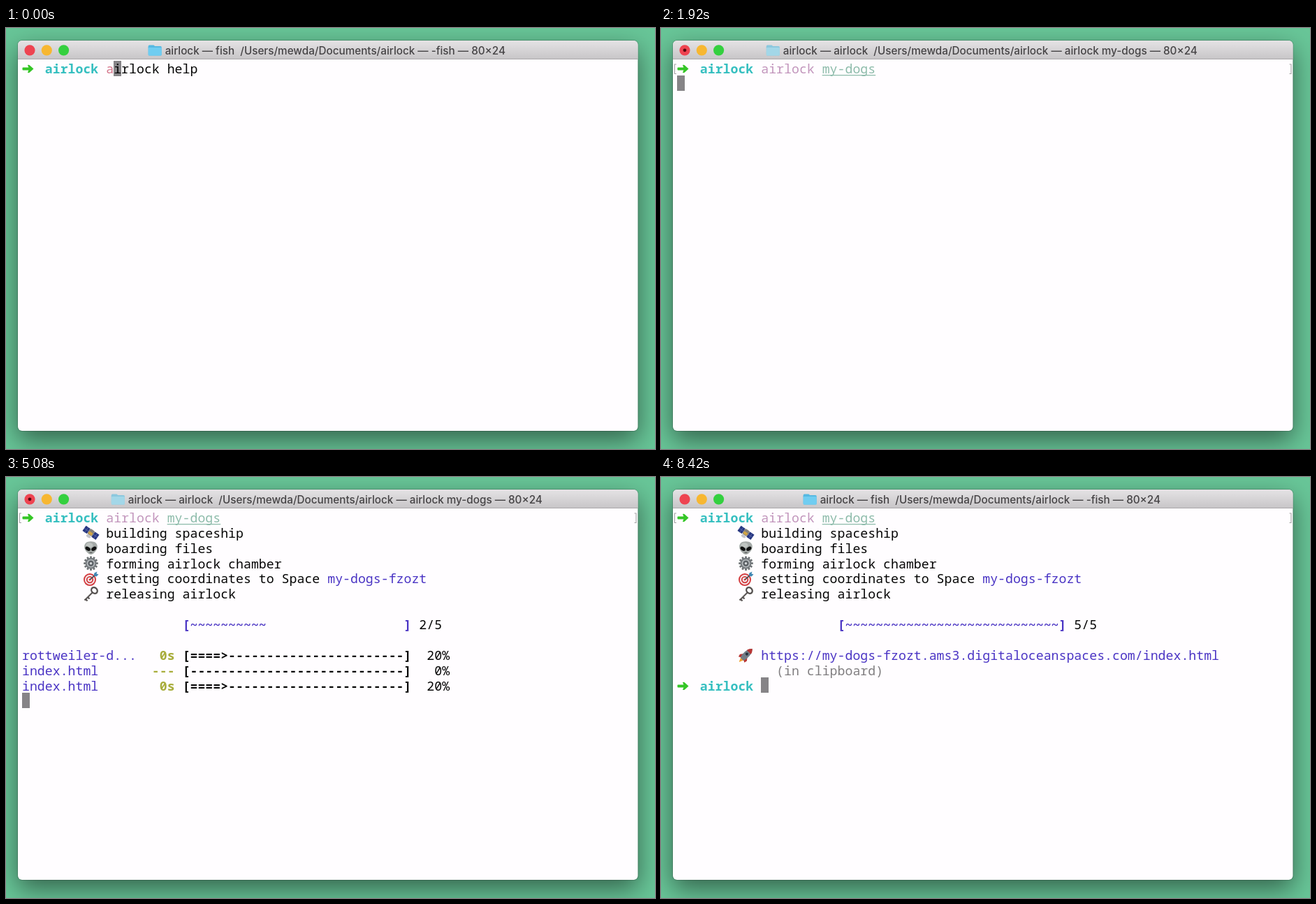
An HTML page with a canvas for the animation above (8.58 s loop, 929x603 px).

```html
<!DOCTYPE html>
<html lang="en">
<head>
<meta charset="utf-8">
<title>Airlock terminal</title>
<style>
  html, body { margin: 0; width: 100%; height: 100%; overflow: hidden; background: #68c698; }
  canvas { display: block; }
</style>
</head>
<body>
<canvas id="stage" width="929" height="603"></canvas>
<script>
const ctx = document.getElementById('stage').getContext('2d');
const LOOP = 8580, LEFT = 23, CELL = 10.93, TOP = 46.5, LINE = 21.9;
const BLACK = '#050505', CYAN = '#36bfc0', GREEN = '#35c626', MAUVE = '#c295bc', RED = '#d5778c',
      TEAL = '#8dbbaa', BLUE = '#4a34c4', OLIVE = '#a8ad3b', GREY = '#807e80', CURSOR = '#868487';

const COMMAND = 'airlock my-dogs';
const KEYS = [0, 80, 170, 330, 420, 500, 750, 920, 1080, 1170, 1330, 1330, 1500, 1580, 1670];
const ENTER = 1830, DONE = 5920, PROMPT = 6080;
const STEPS = [
  [2000, 'building spaceship', satellite],
  [2080, 'boarding files', alien],
  [2170, 'forming airlock chamber', gear],
  [4250, 'setting coordinates to Space', target],
  [4330, 'releasing airlock', key]
];
const UPLOAD = 4420;
const COUNTS = [4670, 5000, 5250, 5330, 5420];
const FILES = [['rottweiler-d...', 4670], ['index.html', 5250], ['index.html', 5080]];

const passed = (times, t) => times.filter(x => x <= t).length;
const colX = col => LEFT + col * CELL;
const rowY = row => TOP + row * LINE;

function box(x, y, w, h, color, r = 0) {
  ctx.fillStyle = color;
  ctx.beginPath();
  ctx.roundRect(x, y, w, h, r);
  ctx.fill();
}

function oval(x, y, rx, ry, color, turn = 0) {
  ctx.fillStyle = color;
  ctx.beginPath();
  ctx.ellipse(x, y, rx, ry, turn, 0, 7);
  ctx.fill();
}

function shape(path, color) {
  ctx.fillStyle = color;
  ctx.fill(new Path2D(path));
}

function line(path, color, width) {
  ctx.strokeStyle = color;
  ctx.lineWidth = width;
  ctx.stroke(new Path2D(path));
}

// One character per terminal cell
function text(str, col, row, color = BLACK, weight = 500) {
  ctx.font = `${weight} 18.2px "Noto Sans Mono", "DejaVu Sans Mono", monospace`;
  ctx.textAlign = 'left';
  ctx.fillStyle = color;
  [...str].forEach((c, i) => ctx.fillText(c, colX(col + i), rowY(row) + 18.3));
}

function cursor(col, row) {
  box(Math.round(colX(col)), Math.round(rowY(row)), 11, 22, CURSOR);
}

function icon(draw, row) {
  ctx.save();
  ctx.translate(121.5, rowY(row) + 11.5);
  draw();
  ctx.restore();
}

function satellite() {
  ctx.rotate(0.6);
  for (const x of [-11.5, 4]) {
    box(x, -4.5, 7.5, 9, '#26357f');
    line(`M${x + 4} -4.5v9M${x} 0h7.5`, '#5f6fb4', 0.7);
  }
  box(-4, -5, 8, 9, '#85807a', 2);
  box(-3, -1, 6, 4, '#d2a544', 1);
  oval(0, 6, 3.5, 2, '#c4c5ca');
}

function alien() {
  shape('M0 -9.5C12 -9.5 11 2 5 6.5C2 10 -2 10 -5 6.5C-11 2 -12 -9.5 0 -9.5', '#a5aaa8');
  oval(-2, -4, 5, 3.5, '#c0c5c2');
  oval(-4.3, 1, 4, 2.6, '#111', 0.6);
  oval(4.3, 1, 4, 2.6, '#111', -0.6);
  line('M-2 6.5h4', '#444', 1);
}

function gear() {
  for (let i = 0; i < 12; i++) {
    ctx.rotate(Math.PI / 6);
    box(-1.4, -10.3, 2.8, 5, '#6f7376', 0.5);
  }
  oval(0, 0, 8, 8, '#787d81');
  oval(0, 0, 5.8, 5.8, '#b9bdc0');
  oval(0, 0, 4.2, 4.2, '#5c6166');
  oval(0, 0, 1.8, 1.8, '#d4d7d9');
}

function target() {
  ['#d33b3f', '#f5eeee', '#d33b3f', '#f5eeee', '#d33b3f']
    .forEach((c, i) => oval(-1.5, 1.5, 9 - i * 1.9, 9 - i * 1.9, c));
  line('M-1 1L6 -5', '#48494d', 1.8);
  shape('M4 -4L5 -8L9 -10L8 -7L11 -6L8 -3Z', '#3f87b3');
}

function key() {
  line('M2 -2L-9 9M-8 7l3 3M-5 4l3 3', '#565150', 2.3);
  ctx.beginPath();
  ctx.ellipse(5, -5, 4.7, 3.9, 0.8, 0, 7);
  ctx.stroke();
  line('M1 -2L-8 7', '#aaa7a6', 0.7);
}

function rocket() {
  ctx.rotate(Math.PI / 4);
  shape('M-3 7L0 14L3 7Z', '#f0a12f');
  shape('M-3 0L-7 5L-6 9L0 6L6 9L7 5L3 0Z', '#b93433');
  shape('M0 -13C6 -7 5 2 3 8H-3C-5 2 -6 -7 0 -13', '#747d86');
  shape('M0 -13C3 -10 4 -8 4 -6H-4C-4 -8 -3 -10 0 -13', '#b93433');
  oval(0, -2, 2, 2, '#26323e');
}

function arrow(row) {
  const y = rowY(row) + 12;
  box(23.5, y - 2, 10, 4, GREEN, 1);
  shape(`M31 ${y - 5.5}Q33 ${y - 6} 34 ${y - 5}L39.5 ${y}L34 ${y + 5}Q33 ${y + 6} 31 ${y + 5.5}L33 ${y}Z`, GREEN);
}

function prompt(row) {
  arrow(row);
  text('airlock', 3, row, CYAN, 700);
}

function drawWindow() {
  ctx.fillStyle = '#68c698';
  ctx.fillRect(0, 0, 929, 603);
  ctx.save();
  ctx.shadowColor = 'rgba(0,0,0,.5)';
  ctx.shadowBlur = 36;
  ctx.shadowOffsetY = 13;
  box(17, 18, 887.5, 559, '#fffdff', 6);
  ctx.restore();
  const bar = ctx.createLinearGradient(0, 18, 0, 44);
  bar.addColorStop(0, '#e5e3e5');
  bar.addColorStop(1, '#c8c6c8');
  box(17, 18, 887.5, 26, bar, [6, 6, 0, 0]);
  box(17, 44, 887.5, 1, '#aaa8aa');
  ctx.strokeStyle = 'rgba(0,0,0,.16)';
  ctx.lineWidth = 1;
  ctx.beginPath();
  ctx.roundRect(16.5, 17.5, 888.5, 560, 6.5);
  ctx.stroke();
}

function drawTitle(t) {
  const busy = t >= ENTER && t < PROMPT;
  ['#ee4451', '#f7b731', '#34d03f'].forEach((c, i) => oval(34 + i * 24.3, 31.8, 7.6, 7.6, c));
  if (busy) oval(34, 31.8, 2.4, 2.4, '#55090f');

  const shell = busy && t < DONE ? 'airlock' : 'fish';
  const job = busy ? 'airlock my-dogs' : '-fish';
  const title = `airlock — ${shell} \u00a0/Users/mewda/Documents/airlock — ${job} — 80×24`;
  ctx.font = '500 15.25px Inter, "Open Sans", sans-serif';
  ctx.textAlign = 'center';
  ctx.fillStyle = '#454345';
  ctx.fillText(title, 471.3, 37.8);

  const x = 471.3 - ctx.measureText(title).width / 2 - 24;
  box(x, 24.5, 9, 5, busy ? '#8bc8de' : '#55b9e2', 1.5);
  box(x, 26, 19, 13.5, busy ? '#8bc8de' : '#55b9e2', 1.5);
  box(x, 28, 19, 11.5, busy ? '#a3d7e8' : '#70cdf1', 1.5);
}

function drawCommand(t) {
  const n = passed(KEYS, t);
  const hint = n < 9 ? 'airlock help' : COMMAND;
  prompt(0);
  if (t < ENTER) cursor(11 + n, 0);
  text(hint.slice(n), 11 + n, 0);
  text(COMMAND.slice(0, Math.min(n, 7)), 11, 0, n < 7 ? RED : MAUVE);
  if (n > 8) {
    text(COMMAND.slice(8, n), 19, 0, TEAL);
    box(colX(19), 67, (n - 8) * CELL, 1.2, TEAL);
  }
  if (t >= ENTER) {
    line('M22 52h-2.5v13.5h2.5M899.5 52h2.5v13.5h-2.5', '#a6a4a6', 1.1);
  }
}

function drawUpload(t) {
  const n = passed(COUNTS, t);
  const fill = n === 5 ? 28 : Math.floor(n * 5.5 - n / 4);
  text('[' + '~'.repeat(fill).padEnd(28) + ']', 21, 7, BLUE, 600);
  text(n + '/5', 52, 7);
  if (t >= DONE) return;
  FILES.forEach(([name, start], i) => {
    const row = 9 + i, active = t >= start;
    text(name, 0, row, BLUE);
    text(active ? ' 0s' : '---', 17, row, OLIVE, 600);
    text('[' + (active ? '====>' : '').padEnd(28, '-') + ']', 21, row, BLACK, 600);
    text(active ? '20%' : ' 0%', 53, row);
  });
}

function drawOutput(t) {
  const n = passed(STEPS.map(s => s[0]), t);
  STEPS.slice(0, n).forEach(([, label, draw], i) => {
    icon(draw, i + 1);
    text(label, 11, i + 1);
  });
  if (n > 3) text('my-dogs-fzozt', 40, 4, BLUE);
  if (t >= UPLOAD) drawUpload(t);
  if (t >= DONE) {
    icon(rocket, 9);
    text('https://my-dogs-fzozt.ams3.digitaloceanspaces.com/index.html', 11, 9, BLUE);
    text('(in clipboard)', 13, 10, GREY);
  }
  if (t >= PROMPT) {
    prompt(11);
    cursor(11, 11);
  } else {
    cursor(0, t >= DONE ? 11 : t >= UPLOAD ? 12 : n + 1);
  }
}

function frame(now) {
  const t = now % LOOP;
  drawWindow();
  drawTitle(t);
  drawCommand(t);
  if (t >= ENTER) drawOutput(t);
  requestAnimationFrame(frame);
}
requestAnimationFrame(frame);
</script>
</body>
</html>
```
